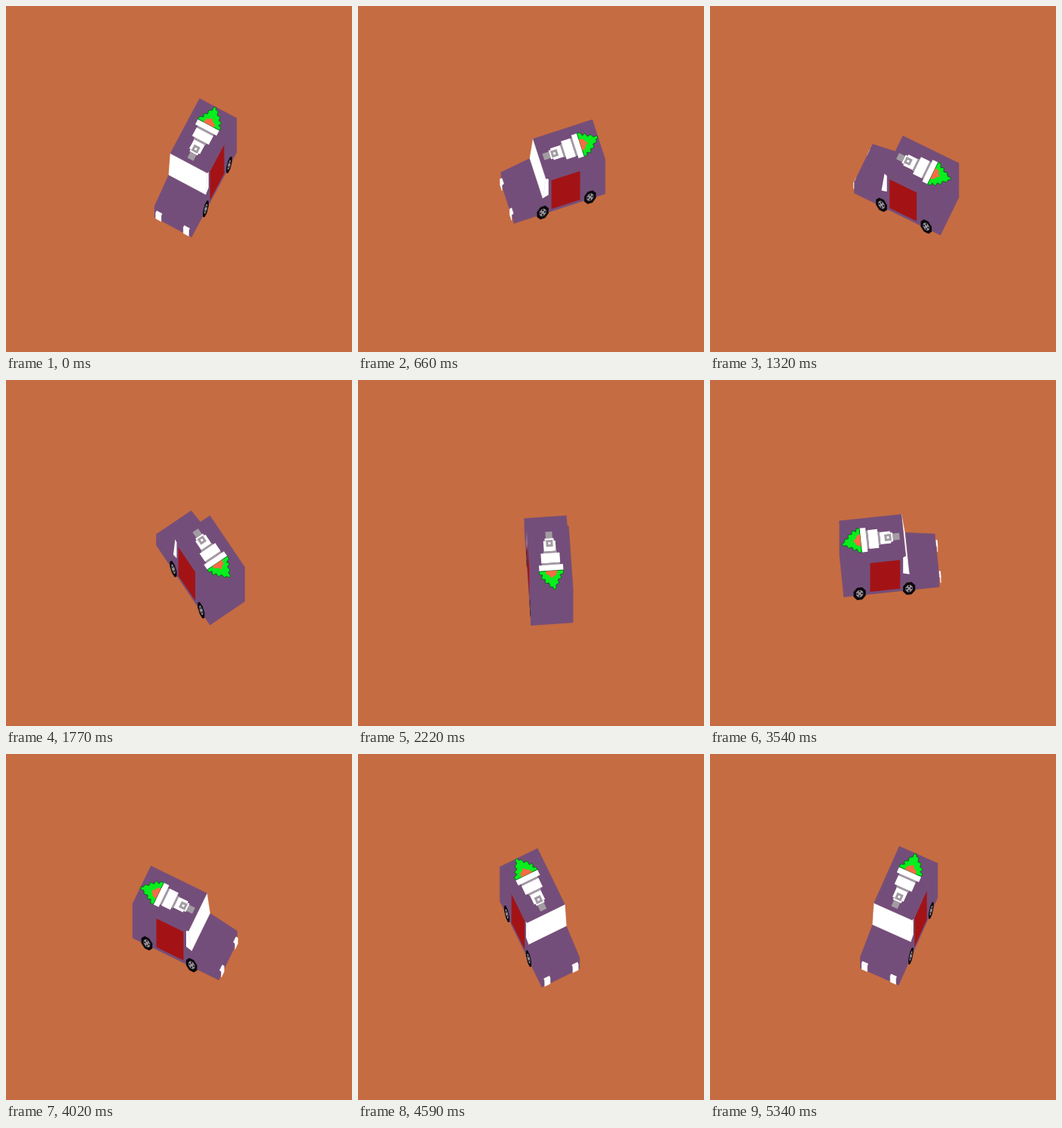
An HTML page with a canvas for the animation above (5370 ms loop, 459 by 459 pixels).

```html
<!DOCTYPE html>
<html lang="en">
<head>
<meta charset="utf-8">
<title>Turning van</title>
<style>
  html, body { margin: 0; width: 100%; height: 100%; overflow: hidden; background: #c66c42; }
  canvas { display: block; width: 459px; height: 459px; }
</style>
</head>
<body>
<canvas id="stage" width="459" height="459"></canvas>
<script>
const ctx = document.getElementById('stage').getContext('2d');
const LOOP = 5370, STEP = 30, START = 118, TURN = 2;
const PIVOT = 249;
const COLOR = {
  ground: '#c66c42', body: '#744e7a', door: '#a31315', white: '#fff',
  grey: '#a29ca2', leaf: '#08ee1e', leafEdge: '#0a6a1c', fruit: '#fb6a44',
  tyre: '#0c080c', hub: '#96909a'
};

// Van space: u runs forward, v to the right, z up.
const REAR = -75, FRONT = 52, LEFT = -24.5, RIGHT = 31;
const ROOF_U = 7.5, ROOF_Z = 45.5, HOOD_U = 12, HOOD_Z = 21, NOSE_Z = 15;
const CONE_V = 4;
const SIDE = [[REAR, 0], [REAR, ROOF_Z], [ROOF_U, ROOF_Z], [HOOD_U, HOOD_Z], [FRONT, NOSE_Z], [FRONT, 0]];
const DOOR = [[-40, 3], [-40, 41], [0, 41], [0, 3]];
const WINDOW = [[4, 44], [4, 23], [HOOD_U, HOOD_Z], [ROOF_U, ROOF_Z]];
const LEAVES = [
  [-50, -16], [-54, -16], [-55, -12], [-60, -14], [-61, -9], [-66, -9],
  [-66, -4], [-71, -3], [-72, 1], [-75, 2], [-74, 5], [-69, 5],
  [-67, 9], [-62, 8], [-60, 13], [-56, 11], [-54, 16], [-50, 16]
];
const FRUIT = [[-50, -8], [-54, -7], [-56, -3], [-60, 0], [-57, 3], [-56, 6], [-50, 8]];

let cos = 1, sin = 0;

function trace(points) {
  ctx.beginPath();
  for (const [u, v, z] of points) {
    ctx.lineTo(PIVOT + u * cos - v * sin, PIVOT + u * sin + v * cos - z);
  }
  ctx.closePath();
}

function fill(points, color) {
  trace(points);
  ctx.fillStyle = color;
  ctx.fill();
}

// A body panel gets a hairline so that neighbours join without a seam.
function panel(points, color = COLOR.body) {
  fill(points, color);
  ctx.strokeStyle = color;
  ctx.lineWidth = 0.6;
  ctx.stroke();
}

// A panel across the van between two (u, z) edges.
function span(u1, z1, u2, z2, color, v1 = LEFT, v2 = RIGHT) {
  panel([[u1, v1, z1], [u1, v2, z1], [u2, v2, z2], [u2, v1, z2]], color);
}

function disc(u, v, z, r, color, sides = 8) {
  const points = [];
  for (let i = 0; i < sides; i++) {
    const a = (i + 0.5) * 2 * Math.PI / sides;
    points.push([u + r * Math.cos(a), v, z + r * Math.sin(a)]);
  }
  fill(points, color);
}

function wheel(u, v) {
  const z = 2;
  disc(u, v, z, 8.8, COLOR.tyre);
  disc(u, v, z, 5, COLOR.hub);
  for (const [du, dz] of [[-3, 0], [3, 0], [0, -3], [0, 3]]) {
    disc(u + du, v, z + dz, 1.4, COLOR.tyre, 4);
  }
}

function side(v) {
  const place = shape => shape.map(([u, z]) => [u, v, z]);
  panel(place(SIDE));
  fill(place(DOOR), COLOR.door);
  fill(place(WINDOW), COLOR.white);
  wheel(-54, v);
  wheel(12, v);
}

function headlights() {
  for (const v of [-17.5, 24]) {
    span(FRONT, 10, FRONT + 2.5, 9.5, COLOR.white, v - 4, v + 4);
    span(FRONT + 2.5, 9.5, FRONT + 2.5, 2, COLOR.white, v - 4, v + 4);
  }
}

function onRoof([u, v]) {
  return [u, v + CONE_V, ROOF_Z];
}

function bar(u1, u2, half, color) {
  fill([[u1, -half], [u1, half], [u2, half], [u2, -half]].map(onRoof), color);
}

function cone() {
  bar(2, -7, 4.5, COLOR.grey);
  bar(-7, -10, 6, COLOR.white);
  bar(-10, -24, 8, COLOR.white);
  bar(-9, -18, 4.5, COLOR.grey);
  bar(-12, -15, 1.5, COLOR.white);
  bar(-24, -26.5, 9, COLOR.grey);
  bar(-26.5, -39.5, 12.5, COLOR.white);
  bar(-39.5, -42, 12, COLOR.grey);
  bar(-42, -50.5, 16, COLOR.white);
  fill(LEAVES.map(onRoof), COLOR.leaf);
  ctx.strokeStyle = COLOR.leafEdge;
  ctx.lineWidth = 1;
  ctx.stroke();
  fill(FRUIT.map(onRoof), COLOR.fruit);
}

function draw(time) {
  const heading = (START + TURN * Math.floor((time % LOOP) / STEP)) * Math.PI / 180;
  cos = Math.cos(heading);
  sin = Math.sin(heading);
  ctx.fillStyle = COLOR.ground;
  ctx.fillRect(0, 0, 459, 459);

  if (sin <= 0) headlights();
  span(HOOD_U, HOOD_Z, FRONT, NOSE_Z);
  if (sin > 0) {
    span(FRONT, NOSE_Z, FRONT, 0);
    headlights();
  } else {
    span(REAR, ROOF_Z, REAR, 0);
  }
  side(cos < 0 ? LEFT : RIGHT);
  const glassSlope = (HOOD_U - ROOF_U) / (ROOF_Z - HOOD_Z);
  if (sin + glassSlope > 0) span(ROOF_U, ROOF_Z, HOOD_U, HOOD_Z, COLOR.white);
  span(REAR, ROOF_Z, ROOF_U, ROOF_Z);
  cone();
}

const begin = performance.now();
function tick() {
  draw(performance.now() - begin);
  requestAnimationFrame(tick);
}
tick();
</script>
</body>
</html>
```
